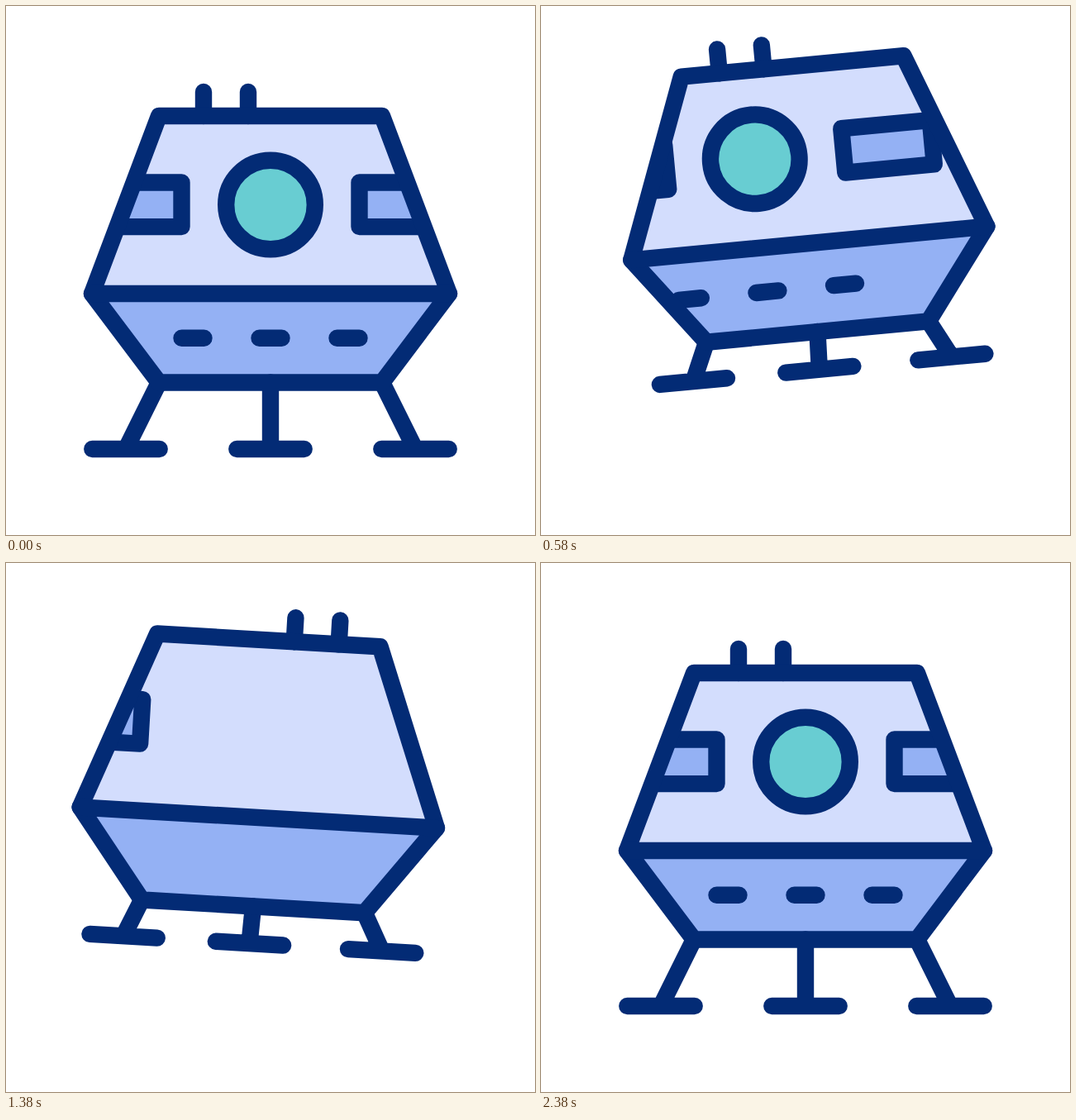
Animation of 640x640 px, one loop 2.4 s. Source, as an HTML page:

```html
<!DOCTYPE html>
<html lang="en">
<head>
<meta charset="utf-8">
<title>Landing capsule</title>
<style>
  html, body { margin: 0; width: 100%; height: 100%; overflow: hidden; background: #fff; }
  svg { display: block; width: 100%; height: 100%; }
  .line { fill: none; stroke: #032b75; stroke-width: 20.4; stroke-linecap: round; stroke-linejoin: round; }
  .mid { fill: #94b1f4; }
  .pale { fill: #d3ddfd; }
  .glass { fill: #68cdd2; }
  .dust { fill: none; stroke: #ffcb50; stroke-width: 20.4; stroke-linecap: round; }
</style>
</head>
<body>
<svg viewBox="0 0 640 640">
  <defs>
    <path id="hull" d="M-135 -215H135L216 0L135 107.5H-135L-216 0Z"/>
    <clipPath id="shell"><use href="#hull"/></clipPath>
    <rect id="panel" class="line mid" x="107.5" y="-134.5" width="108" height="53.6"/>
    <path id="curl" class="dust" d="M145.7 538H74A40 40 0 1 1 114 498"/>
  </defs>
  <g id="craft">
    <use href="#hull" class="pale"/>
    <path class="mid" d="M-216 0H216L135 107.5H-135Z"/>
    <g clip-path="url(#shell)">
      <g id="skin">
        <use href="#panel"/>
        <use href="#panel" transform="scale(-1 1)"/>
        <circle class="line glass" cy="-107.5" r="53.8"/>
        <path class="line" d="M-107.5 53.7h27m67 0h27m67 0h27"/>
      </g>
    </g>
    <path id="masts" class="line" d="M-81 -215v-29m54 0v29"/>
    <path id="legs" class="line"/>
    <use href="#hull" class="line"/>
    <path class="line" d="M-216 0H216"/>
  </g>
  <g id="dust">
    <use href="#curl"/>
    <use href="#curl" transform="translate(640 0) scale(-1 1)"/>
  </g>
</svg>
<script>
const LOOP = 2400;
const CURL = 71.7 + 60 * Math.PI;
const LAND = 1512;    // descent begins
const AWAY = 565;     // spin begins
const FRONT = 1183;   // front side starts to come back
const FACING = 1930;  // spin ends
const el = id => document.getElementById(id);
const craft = el('craft'), skin = el('skin'), masts = el('masts');
const legs = el('legs'), dust = el('dust');

// Eased progress of t from a to b, between 0 and 1.
function ease(t, a, b) {
  const u = Math.min(1, Math.max(0, (t - a) / (b - a)));
  return u * u * (3 - 2 * u);
}

const lift = t => 61 * ease(t, 0, 577) - 23 * ease(t, 676, 1182)
  + 3 * ease(t, 1182, LAND) - 41 * ease(t, LAND, 2005);

const tilt = t => -5.4 * ease(t, 0, 499) + 9.65 * ease(t, 632, 1130)
  - 4.25 * ease(t, 1130, 1970);

const sway = t => 5.5 * ease(t, 0, 510) - 33.5 * ease(t, 510, 1140)
  + 29 * ease(t, 1140, 1650) - ease(t, 1650, 2000);

const fold = t => 35.5 * (ease(t, 0, 634) - ease(t, LAND, 1871));

const mastMove = t => -8 * ease(t, 0, AWAY) + 143.5 * ease(t, AWAY, 1150)
  - 135.5 * ease(t, FRONT, FACING);

// The surface leaves on the right and returns from the left.
const skinMove = t => t < FRONT
  ? -57.4 * ease(t, 0, AWAY) + 779 * ease(t, AWAY, 1150)
  : 440 * (ease(t, FRONT, FACING) - 1);

function legPath(f) {
  const y = 188 - f, lean = 0.055 * f;
  return [-1, 0, 1].map(side => {
    const x = side * (175 - 0.52 * f) + (side ? lean : -lean);
    return `M${side * 135} 107.5L${x} ${y}m-40.7 0h81.4`;
  }).join('');
}

function draw(t) {
  craft.setAttribute('transform',
    `translate(${320 + sway(t)} ${348 - lift(t)}) rotate(${tilt(t)})`);
  skin.setAttribute('transform', `translate(${skinMove(t)} 0)`);
  masts.setAttribute('transform', `translate(${mastMove(t)} 0)`);
  legs.setAttribute('d', legPath(fold(t)));

  const tail = CURL * ease(t, 1920, 2360);
  const length = CURL * ease(t, 1554, 2142) - tail;
  dust.setAttribute('visibility', length > 0.1 ? 'visible' : 'hidden');
  dust.setAttribute('stroke-dasharray', `${Math.max(length, 0.1)} 999`);
  dust.setAttribute('stroke-dashoffset', -tail);
}

const start = performance.now();
function tick() {
  draw((performance.now() - start) % LOOP);
  requestAnimationFrame(tick);
}
draw(0);
requestAnimationFrame(tick);
</script>
</body>
</html>
```
